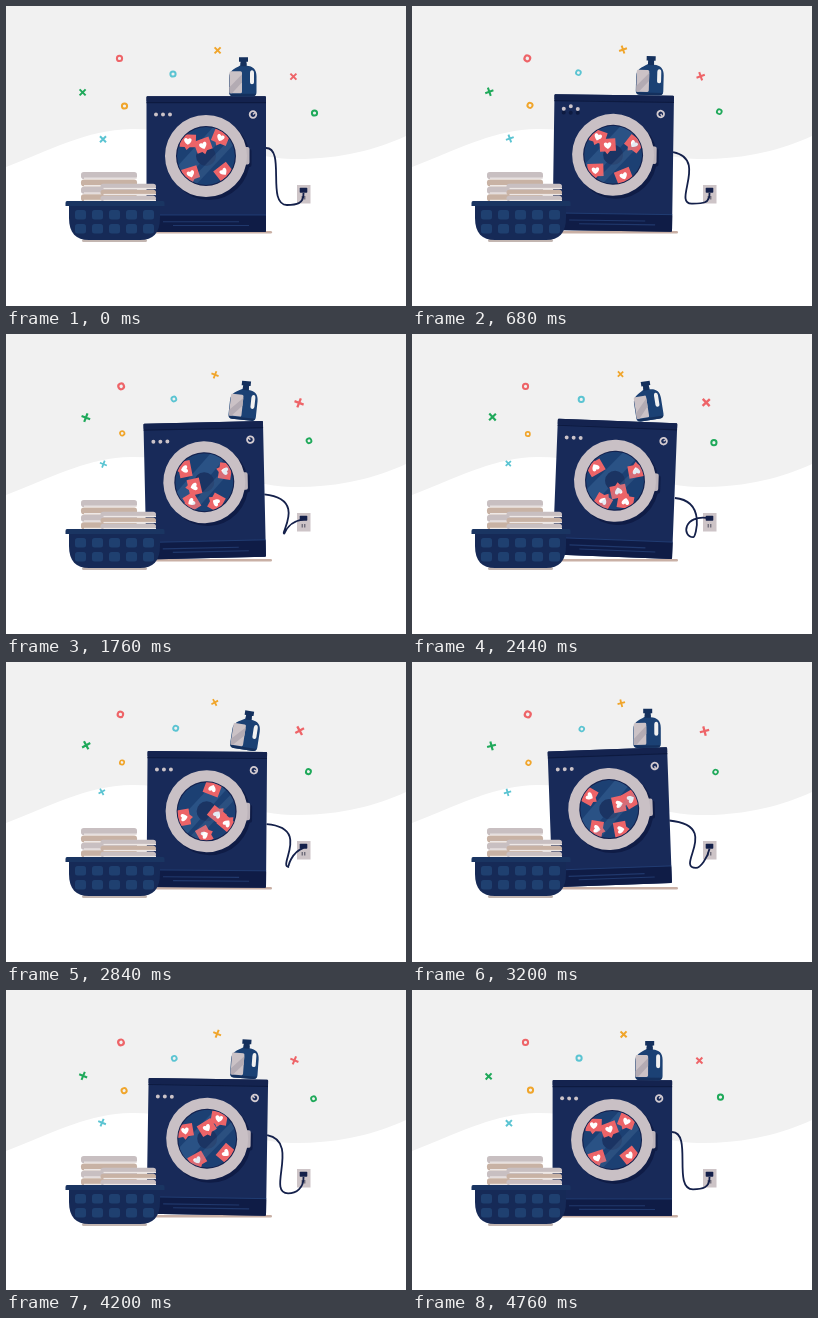
Animation, 400 px wide and 300 px high, one loop 4.8 s. Source, as an HTML page:

```html
<!DOCTYPE html>
<html lang="en">
<head>
<meta charset="utf-8">
<title>Washing day</title>
<style>
html, body { margin: 0; width: 100%; height: 100%; overflow: hidden; background: #fff; }
svg { display: block; width: 100vw; height: 100vh; }
</style>
</head>
<body>
<svg viewBox="0 0 400 300">
  <defs>
    <clipPath id="glass"><circle cx="200" cy="150" r="29"/></clipPath>
    <g id="card">
      <path fill="#ec6468" d="M-8-6.5H8V6H2L-1 9L-3 6H-8Z"/>
      <path fill="#fff" d="M0 3.8C-7-1-2.5-5 0-1.8C2.5-5 7-1 0 3.8Z"/>
    </g>
  </defs>
  <path fill="#f1f1f1" d="M0 0H400V130C370 144 330 154 285 153C240 152 180 122 125 123C80 124 45 144 0 161Z"/>
  <g id="bits" fill="none" stroke-width="2"></g>

  <rect x="148" y="225" width="118" height="2.4" rx="1.2" fill="#c9b0a5"/>
  <rect x="291" y="179" width="13.5" height="18.5" fill="#cdc4c7"/>
  <path d="M296.2 190v3.5M298.8 190v3.5" stroke="#4a4a5c"/>
  <path id="cable" fill="none" stroke="#14204a" stroke-width="1.8"/>
  <rect x="293.7" y="181.7" width="7.6" height="5" rx=".7" fill="#14204a"/>

  <g id="machine">
    <rect x="140.5" y="90.2" width="119.5" height="135.8" rx="1" fill="#182a59"/>
    <rect x="140.5" y="90.2" width="119.5" height="5.8" rx="1" fill="#14234f"/>
    <path d="M140.5 96.7H260" stroke="#0d1a40" stroke-width="1.2"/>
    <rect x="140.5" y="209" width="119.5" height="17" rx="1" fill="#0f1c46"/>
    <path d="M140.5 209H260" stroke="#24427a" stroke-width=".8"/>
    <path d="M157 215.8H233M167 219.5H243" stroke="#20386c" stroke-width="1.1"/>
    <g id="buttons"></g>
    <g id="dial">
      <circle r="3.3" fill="#182a59" stroke="#d3cbd0" stroke-width="1.8"/>
      <path d="M0 0L2-2" stroke="#d3cbd0" stroke-width="1.4"/>
    </g>
    <circle cx="203" cy="153" r="41" fill="#0f1c46"/>
    <rect x="238" y="143" width="7.5" height="18" rx="2" fill="#0f1c46"/>
    <rect x="236" y="141" width="7.5" height="17.5" rx="2" fill="#bdb4bb"/>
    <circle cx="200" cy="150" r="41" fill="#c9c0c5"/>
    <circle cx="200" cy="150" r="30" fill="#14224f"/>
    <g clip-path="url(#glass)">
      <circle cx="200" cy="150" r="29" fill="#1c4073"/>
      <path fill="#2a5285" d="M167 165L210 118L223 124L177 177Z"/>
      <circle cx="200" cy="150" r="10" fill="#1b3463"/>
      <g id="cards"></g>
      <path fill="#7296ba" opacity=".18" d="M181 178L225 132L229 137L187 182Z"/>
    </g>
  </g>

  <g id="bottle">
    <path fill="#1b4174" fill-rule="evenodd" d="M-2.500-33H3.500V-30.500C10-30 13.500-27 13.500-20V-4Q13.500 0 9.500 0H-10Q-14 0-14-4V-18C-14-26-9-27-2.500-31ZM9-26Q7-26 7-23V-14Q7-12 9-12Q11-12 11-14V-23Q11-26 9-26Z"/>
    <path fill="#14305d" d="M-4-39H5V-34.500H3.500V-30H-2.500V-34.500H-4ZM-13.300-2.500H13Q12.500 0 9.500 0H-10Q-12.500 0-13.300-2.500Z"/>
    <rect x="-13.500" y="-25" width="12.500" height="22" rx="1.500" fill="#cbc2c6"/>
    <path fill="#b3abb3" d="M-13.500-9L-1-22V-14L-11-3H-13.500Z"/>
  </g>

  <g id="laundry"></g>
  <rect x="76" y="233" width="65" height="3" rx="1.5" fill="#c3b6b1"/>
  <path fill="#162a57" d="M63 199H154V212C154 227 147 234 134 234H83C70 234 63 227 63 212Z"/>
  <path fill="#1a3562" d="M61 195H157Q158.500 195 158.500 197V200H59.500V197Q59.500 195 61 195Z"/>
  <g id="holes" fill="#1f4070"></g>
</svg>
<script>
const LOOP = 4800, TAU = Math.PI * 2;
const $ = id => document.getElementById(id);
const mix = (from, to, p) => from + (to - from) * p;
const swing = a => (1 - Math.cos(a)) / 2;
const deg = a => a * 360 / TAU;

function add(parent, tag, attrs) {
  const el = document.createElementNS('http://www.w3.org/2000/svg', tag);
  for (const k in attrs) el.setAttribute(k, attrs[k]);
  return parent.appendChild(el);
}

function place(el, x, y, rot = 0, size = 1) {
  el.setAttribute('transform', `translate(${x} ${y}) rotate(${rot}) scale(${size})`);
}

// Towels and basket
function pile(x, y, width, count, step) {
  for (let i = 0; i < count; i++, y += step) {
    add($('laundry'), 'rect', { x, y, width, height: step - .4, rx: 2.8, fill: i % 2 ? '#c8b2a4' : '#c8bfc1' });
    add($('laundry'), 'rect', { x: x + 3, y: y + step - 1.8, width: width - 3, height: 1.2, fill: '#eee8e6' });
  }
}
pile(75, 166, 56, 4, 7.4);
pile(94.5, 177.7, 55.5, 3, 6);
for (let i = 0; i < 10; i++)
  add($('holes'), 'rect', { x: 69 + i % 5 * 17, y: i < 5 ? 204 : 218, width: 11, height: 9.5, rx: 2.5 });

// Floating marks: a is the loop angle, u swings out and back once, v twice
const RING = 'M-2.6 0A2.6 2.6 0 1 1 2.6 0A2.6 2.6 0 1 1-2.6 0Z';
const CROSS = 'M-3-3L3 3M3-3L-3 3';
const RED = '#ee6468', TEAL = '#5bc4d2', ORANGE = '#f0a52b', GREEN = '#1fa95a';
const bits = [
  [RED, RING, (a, u, v) => [113.5 + 3 * v, 52.4, 1 + .15 * v]],
  [TEAL, RING, (a, u, v) => [168.1 + 1.7 * Math.cos(a + 2.27), 66.7 + 1.7 * Math.sin(a + 2.27), 1 - .15 * v]],
  [ORANGE, RING, (a, u) => [118.5 - 2.7 * u, 100 - .9 * Math.sin(a), 1 - .18 * u]],
  [GREEN, RING, (a, u, v) => [308.5 - 6.6 * u, 107 + 1.6 * u - 2.1 * Math.sin(a), 1 - .15 * v]],
  [ORANGE, CROSS, (a, u) => [211.6 - 3.1 * u, 44.4 - 4.3 * u, 1 - .12 * u]],
  [GREEN, CROSS, (a, u) => [76.6 + 3.9 * u, 86.4 - 3.4 * u, 1 + .1 * u]],
  [RED, CROSS, (a, u) => [287.4 + 6.8 * u, 70.6 - 2.1 * u, 1 + .18 * u]],
  [TEAL, CROSS, (a, u) => [97 - .6 * u + 1.2 * Math.sin(a), 133.2 - 3.7 * u, 1 - .15 * u]]
].map(([stroke, d, pose]) => ({ el: add($('bits'), 'path', { d, stroke }), pose }));

const buttons = [150, 157, 164].map(cx => {
  add($('buttons'), 'circle', { cx, cy: 108.5, r: 2, fill: '#0d1a40' });
  return add($('buttons'), 'circle', { cx, cy: 108.5, r: 2, fill: '#cbc3c9' });
});
const cards = Array.from({ length: 5 }, () => add($('cards'), 'use', { href: '#card' }));

function drawCards(a, power) {
  const turn = a - .8 * Math.sin(a);
  cards.forEach((el, i) => {
    const inner = i === 4;
    const g = inner ? 4.45 - turn : .73 + 1.55 * i + turn;
    // Gravity gathers the outer cards at the bottom of the drum
    const angle = inner ? g : g + .4 * power * Math.cos(g);
    const r = inner ? 11 : 23.5;
    const tilt = inner ? -20 : 20 * i - 38;
    place(el, 200 + r * Math.cos(angle), 150 + r * Math.sin(angle), tilt + deg(turn));
  });
}

// The cable slides down, sags, and flips into a loop halfway
function drawCable(a, u, power, rock) {
  const loop = swing(a + .19) ** 6, s = Math.sin(a);
  const low = 199 + 4 * power - 4 * s;
  const points = [
    [260 + 1.3 * rock, 142 + 22 * u],
    [280 + 38 * power - 26 * loop, 142 + 25 * power],
    [mix(260, 286, loop), low],
    [281 - 4 * s * power, low],
    [mix(290, 268, loop), low],
    [mix(298, 268, loop), mix(198, 178, loop)],
    [297.5, 187 - 3 * loop]
  ];
  $('cable').setAttribute('d', `M${points[0]}C${points.slice(1).join(' ')}`);
}

function draw(t) {
  const a = TAU * t / LOOP, u = swing(a), v = swing(2 * a);
  const power = Math.sin(a / 2);

  for (const { el, pose } of bits) {
    const [x, y, size] = pose(a, u, v);
    place(el, x, y, deg(a) / 2, size);
  }

  // The machine tips over whichever foot carries it
  const rock = -2.4 * power * Math.tanh(3 * Math.sin(11 * a));
  const lift = .4 * Math.abs(rock);
  $('machine').setAttribute('transform',
    `translate(0 ${-lift}) rotate(${rock} ${rock > 0 ? 260 : 140.5} 226)`);

  // The bottle rattles on top of it
  const rattle = -power * Math.sin(18 * a);
  const top = 90.2 - lift - Math.sin(Math.abs(rock) / 360 * TAU) * (rock > 0 ? 23 : 97);
  place($('bottle'), 237 + .8 * rock, top - 3 * Math.abs(rattle), 11 * rattle);

  // Buttons pop up one after another
  buttons.forEach((el, i) => {
    const p = Math.min(1, Math.max(0, (t - 360 - 120 * i) / 400));
    place(el, 0, -6.5 * Math.sin(Math.PI * p));
  });
  place($('dial'), 247, 108.5, 2 * deg(a));

  drawCards(a, power);
  drawCable(a, u, power, rock);
}

const start = performance.now();
function tick() {
  draw((performance.now() - start) % LOOP);
  requestAnimationFrame(tick);
}
tick();
</script>
</body>
</html>
```
